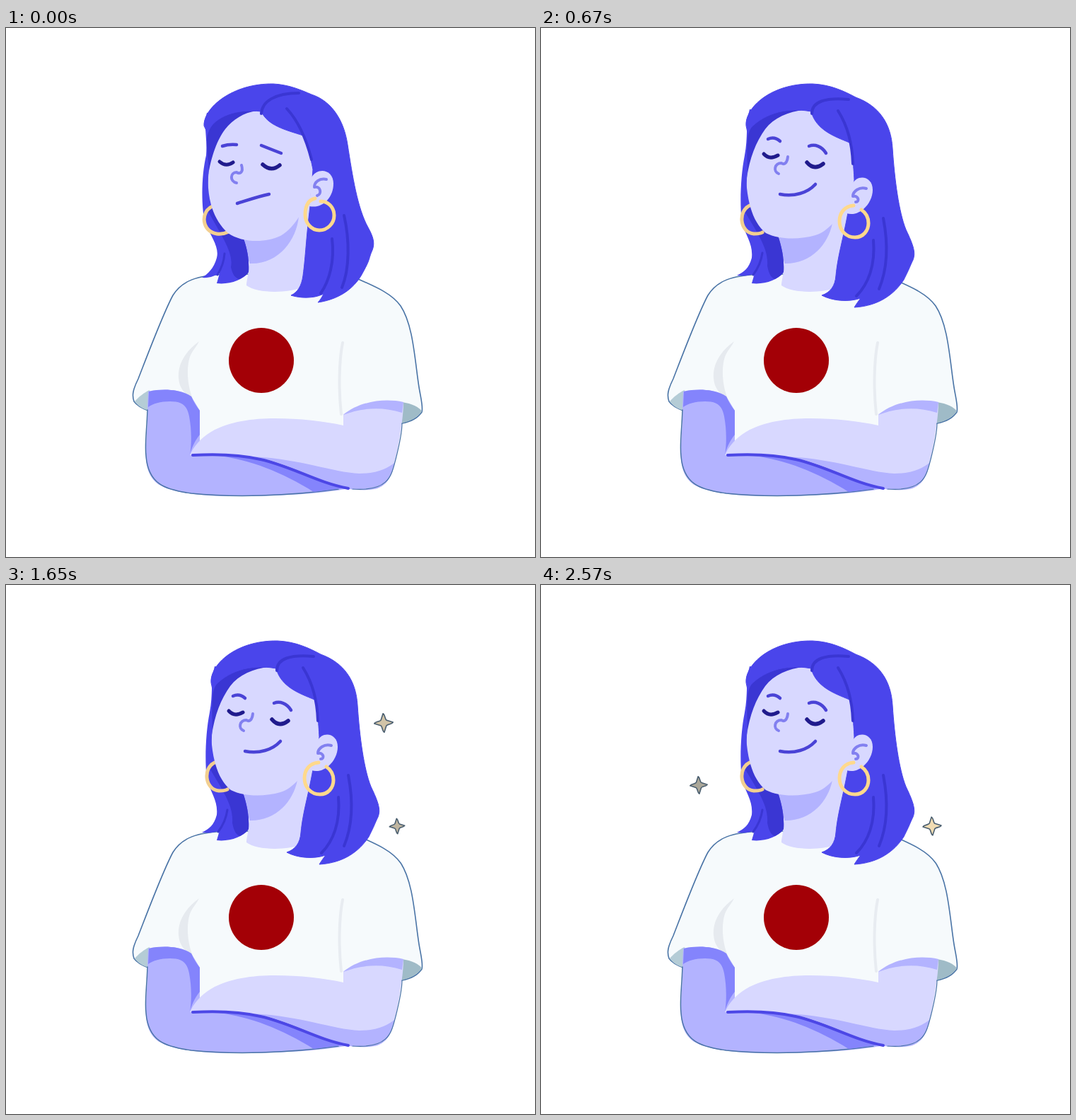
Write an HTML page that moves like this. It is 748 px wide and 748 px high and loops after 2.6 s.

```html
<!DOCTYPE html>
<html lang="en">
<head>
<meta charset="utf-8">
<title>Proud pose</title>
<style>
html, body { margin: 0; width: 100%; height: 100%; overflow: hidden; background: #fff; }
svg { display: block; width: 100vw; height: 100vh; }
</style>
</head>
<body>
<svg id="stage" viewBox="0 0 748 748" stroke-linecap="round" stroke-linejoin="round"></svg>
<script>
const LOOP = 2600;
const HAIR = '#4a45eb', DARK = '#3a36d3', SKIN = '#d8d8ff', SHADE = '#b3b3ff',
      DEEP = '#8484fc', INK = '#4a43d6', EDGE = '#4a74a6', NOSE = '#8280f0', GOLD = '#ffd98c';

const stage = document.getElementById('stage');
const moving = [];

function add(tag, attrs) {
  const el = document.createElementNS('http://www.w3.org/2000/svg', tag);
  for (const k in attrs) el.setAttribute(k, attrs[k]);
  return stage.appendChild(el);
}
const fill = (d, color) => add('path', { d, fill: color });
const line = (d, color, w) => add('path', { d, fill: 'none', stroke: color, 'stroke-width': w });

// rest: slumped pose, swing: hair thrown outwards, end: settled pose
function pose(el, rest, end, swing = end) {
  moving.push({ el, rest, swing, end });
  return el;
}
const poseFill = (color, rest, end, swing) => pose(fill(rest, color), rest, end, swing);
const poseLine = (color, w, rest, end, swing) => pose(line(rest, color, w), rest, end, swing);

function mix(a, b, p) {
  const to = b.match(/-?[\d.]+/g);
  let i = 0;
  return a.replace(/-?[\d.]+/g, n => (+n + (to[i++] - n) * p).toFixed(2));
}

// shirt
add('path', {
  d: 'M310 348C270 350 249 357 236 378C222 404 201 460 187 496C179 512 178 520 181 528C186 535 193 538 201 541L274 600L478 600L560 559C570 557 582 552 588 543C590 536 587 526 584 508C578 470 576 420 558 393C546 376 525 367 498 355L430 348Z',
  fill: '#f6fafc', stroke: EDGE, 'stroke-width': 1.6
});
fill('M203 512C196 515 187 522 182 528C187 535 193 538 201 541Z', '#b4ccd6');
fill('M560 529C574 531 584 536 588 542C582 551 570 557 558 559Z', '#9fbbc7');
fill('M273 443C250 460 239 482 246 505C250 515 257 520 264 524C256 505 255 480 260 465C264 455 270 450 273 443Z', '#e6eaef');
line('M476 445C471 470 470 510 474 546', '#e8ecf1', 4);

// arms
fill('M201 514C225 509 250 512 262 521L274 541L274 600L300 600C360 600 420 630 485 651C465 655 420 661 340 662C280 663 235 658 215 645C200 634 196 615 198 590C199 570 201 550 200 535Z', SHADE);
fill('M202 514C225 509 249 512 262 521C266 530 270 536 274 541L274 575C266 585 262 595 260 604C263 585 262 565 259 549C256 533 248 528 232 528C218 528 208 531 201 536Z', DEEP);
line('M200 540C199 570 196 590 198 605C201 645 225 653 262 658C320 664 400 662 470 652', EDGE, 1.5);
fill('M300 605C345 610 390 628 435 656L475 651C430 635 400 616 350 606Z', DEEP);
fill('M260 604C265 592 275 580 290 571C315 556 350 552 380 552C415 552 450 556 477 562L477 546C505 530 540 526 562 530C562 550 556 585 551 610C546 635 538 646 525 651C510 655 490 653 470 648C440 638 410 620 380 612C340 605 300 604 260 604Z', SKIN);
fill('M350 606C420 610 460 628 500 630C525 630 541 622 550 614C545 637 538 646 525 651C510 655 490 653 480 651C440 640 400 615 350 606Z', SHADE);
fill('M477 547C499 528 535 523 562 529L560 544C530 534 500 538 477 547Z', SHADE);
line('M490 652C542 656 545 632 551 610C556 590 560 572 560 559', EDGE, 1.2);
line('M264 604C300 602 330 603 360 610C405 620 440 643 484 651', '#4c47e6', 4);

// emblem
add('circle', { cx: 361, cy: 470, r: 46, fill: '#a30006' });

// neck
fill('M330 270L344 330C343 350 340 358 340 364C355 375 395 376 422 366L436 240Z', SKIN);
poseFill(SHADE, 'M336 298C370 304 400 285 414 266C411 300 385 335 344 333Z',
  'M336 294C365 300 390 292 412 276C406 306 382 334 344 333Z');

// left lock
poseFill(HAIR,
  'M284 120C279 140 285 155 283 180C276 210 276 250 281 275C290 295 302 310 298 325C294 340 285 348 277 353C288 354 296 350 302 347C300 354 299 358 298 361C315 363 335 357 343 345C344 330 342 315 336 298L340 120Z',
  'M295 115C289 135 293 155 288 180C282 210 281 250 284 275C290 295 300 305 298 325C294 340 287 345 277 350C288 351 296 350 302 347C300 354 299 358 298 361C315 363 335 357 343 345C344 330 342 315 335 293L345 120Z');
poseFill(DARK,
  'M284 256C306 296 322 318 318 338C320 348 324 354 330 355C336 352 341 349 343 345C344 330 342 315 336 298L300 250Z',
  'M286 256C306 290 322 312 320 336C322 348 326 354 331 355C336 352 341 349 343 345C344 330 342 315 335 293L302 250Z');
poseLine(DARK, 3, 'M309 319C308 332 304 341 299 349', 'M313 318C311 332 306 341 300 349');
poseLine('#f2cf90', 5, 'M292 252C274 260 277 288 298 291C306 292 311 290 315 288',
  'M295 251C278 259 281 289 301 291C307 291 310 291 313 289',
  'M294 251C277 259 280 288 300 290C306 290 309 290 312 288');

// face
poseFill(SKIN,
  'M365 115C330 116 307 134 299 155C289 178 285 202 286 226C288 254 298 276 314 290C334 304 367 304 388 294C400 287 408 277 415 266L431 248L437 205L425 150Z',
  'M388 115C345 110 318 132 307 155C295 180 290 202 291 226C294 254 302 277 318 290C338 300 367 299 388 293C398 290 405 284 412 277L433 258L445 215L441 158Z');
poseFill(DARK,
  'M334 117C300 121 284 140 284 160C284 185 288 190 286 208C290 182 299 157 310 143C321 129 336 120 354 117Z',
  'M345 114C312 118 293 138 292 158C290 180 293 190 291 212C295 184 304 161 317 143C329 127 350 118 372 116Z');

// hair
poseFill(HAIR,
  'M280 138C279 113 320 78 378 79C400 80 418 88 432 94C460 103 478 130 483 165C490 210 497 255 512 282C521 298 521 306 518 314C512 328 516 325 505 345C495 365 475 383 441 388C445 384 447 380 449 376C435 383 415 382 403 378C412 374 418 365 420 350C424 320 424 300 430 252L434 200C430 180 425 160 420 152C395 144 370 138 361 118C325 114 298 124 284 146Z',
  'M290 138C288 113 325 78 384 79C410 80 430 90 445 98C478 110 495 135 497 170C500 215 506 260 516 285C527 308 530 318 526 328C519 343 523 336 513 356C500 376 478 393 443 395C446 390 449 386 452 382C435 388 412 386 397 378C409 374 416 365 417 350C420 320 427 300 434 261L443 215C442 195 440 170 436 162C414 153 389 144 382 118C345 111 312 122 292 146Z',
  'M290 138C288 113 325 78 384 79C410 80 430 90 445 98C478 110 495 135 497 170C500 215 508 260 519 285C531 308 533 318 530 328C523 343 527 336 517 356C504 376 480 393 444 396C448 390 451 386 454 382C438 388 418 386 403 380C414 374 420 365 421 350C422 320 428 300 434 261L443 215C442 195 440 170 436 162C414 153 389 144 382 118C345 111 312 122 292 146Z'
).setAttribute('stroke', HAIR);
poseLine(DARK, 4, 'M361 121C362 104 380 92 414 92', 'M383 121C383 104 402 98 435 101');
poseLine(DARK, 4, 'M397 114C412 130 424 155 432 186', 'M420 117C432 136 440 160 441 192');
poseLine(DARK, 4, 'M461 298C465 330 457 358 445 375', 'M470 300C473 335 463 362 446 379',
  'M468 304C470 335 464 362 449 379');
poseLine(DARK, 4, 'M478 265C486 300 486 340 475 367', 'M484 269C491 305 490 340 478 369',
  'M485 269C494 305 492 342 481 372');

// ear and ring
poseFill(SKIN, 'M432 211C441 196 463 200 463 220C463 240 447 256 429 252Z',
  'M440 221C447 206 469 209 469 229C469 248 450 268 432 262Z');
poseLine(NOSE, 4, 'M453 214C443 212 436 218 436 225C445 223 447 235 440 237',
  'M460 227C450 224 441 231 441 238C449 236 451 246 445 246');
poseLine(GOLD, 5, 'M437 241C426 243 423 254 423 264C423 276 432 286 443 286C455 286 464 276 464 265C464 253 455 245 445 245',
  'M442 251C428 252 422 263 422 273C422 286 431 296 444 296C456 296 463 286 463 276C463 267 459 261 453 257',
  'M441 251C427 252 420 263 421 273C421 286 430 296 442 296C455 296 463 286 463 276C462 267 459 261 453 257');

// features
poseLine(INK, 4.5, 'M306 167Q315 164 326 165', 'M321 157Q330 153 338 160');
poseLine(INK, 4.5, 'M361 166C371 170 381 174 389 177', 'M379 167C387 164 397 167 403 177');
poseLine('#201b8c', 5, 'M302 189Q311 197 321 190', 'M315 178Q323 187 335 180');
poseLine('#201b8c', 5.5, 'M363 193Q375 204 387 194', 'M376 190Q386 202 399 192');
poseLine(NOSE, 4, 'M333 194C336 204 331 207 326 204C317 204 316 217 326 219',
  'M349 182C348 191 344 194 340 191C330 191 328 203 336 206');
poseLine(INK, 4.5, 'M327 248C340 244 357 238 372 235', 'M338 235C358 239 377 233 388 221');

// sparkles
const BEAT = 510;
const stars = [
  { x: 534, y: 195, peak: 2265, from: 1010, min: 10, max: 15, low: 0 },
  { x: 223, y: 283, peak: 2420, from: 1145, min: 11.5, max: 13.5, low: 0 },
  { x: 553, y: 341, peak: 2505, from: 1050, min: 8, max: 13.5, low: 0.32 }
];
for (const s of stars) {
  s.el = add('path', {
    d: 'M0 -1C.24 -.85 .14 -.34 .34 -.26L1 0C.85 .24 .34 .14 .26 .34L0 1C-.24 .85 -.14 .34 -.34 .26L-1 0C-.85 -.24 -.34 -.14 -.26 -.34Z',
    stroke: '#4b5f70', 'stroke-width': 1.6, 'vector-effect': 'non-scaling-stroke'
  });
}

const clamp = v => Math.max(0, Math.min(1, v));
const smooth = v => v * v * (3 - 2 * v);
const span = (t, a, b) => smooth(clamp((t - a) / (b - a)));

function drawStar(s, t) {
  const wave = (1 + Math.cos((t - s.peak) / BEAT * 2 * Math.PI)) / 2;
  const v = s.low + (1 - s.low) * wave;
  const on = t >= s.from && v > 0.3;
  s.el.setAttribute('display', on ? 'inline' : 'none');
  if (!on) return;
  const size = s.min + (s.max - s.min) * v;
  const glow = clamp((v - 0.3) / 0.7);
  const tone = [[164, 255], [161, 230], [150, 184]].map(([a, b]) => Math.round(a + (b - a) * glow));
  s.el.setAttribute('fill', `rgb(${tone})`);
  s.el.setAttribute('transform', `translate(${s.x} ${s.y}) rotate(-4) scale(${size})`);
}

function draw(t) {
  const lift = span(t, 30, 230), settle = span(t, 250, 500);
  for (const m of moving) {
    m.el.setAttribute('d', settle > 0 ? mix(m.swing, m.end, settle) : mix(m.rest, m.swing, lift));
  }
  for (const s of stars) drawStar(s, t);
}

const start = performance.now();
function tick() {
  draw((performance.now() - start) % LOOP);
  requestAnimationFrame(tick);
}
draw(0);
requestAnimationFrame(tick);
</script>
</body>
</html>
```
